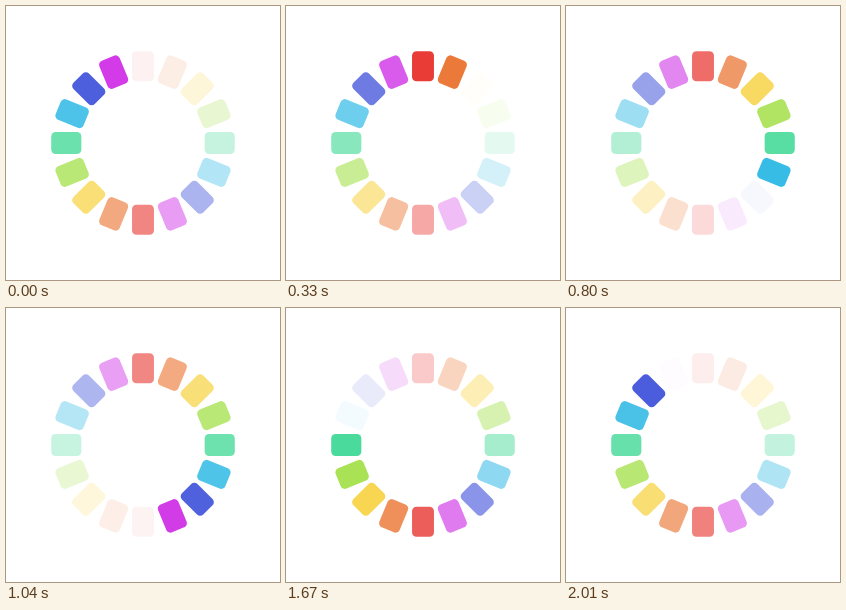
These frames come from a looping animation (274x274 px, 2.04 s). An HTML page:

```html
<!DOCTYPE html>
<html lang="en">
<head>
<meta charset="utf-8">
<title>Rainbow spinner</title>
<style>
  html, body { margin: 0; width: 100%; height: 100%; overflow: hidden; background: #fff; }
  svg { display: block; width: 100%; height: 100%; }
</style>
</head>
<body>
<svg viewBox="0 0 100 100"></svg>
<script>
const LOOP = 2040, STEPS = 61, COUNT = 16;
const colors = ['#e6261f', '#eb7532', '#f7d038', '#a3e048', '#49da9a', '#34bbe6', '#4355db', '#d23be7'];
const svg = document.querySelector('svg');

const bars = Array.from({ length: COUNT }, (_, i) => {
  const bar = document.createElementNS('http://www.w3.org/2000/svg', 'rect');
  const attrs = {
    x: 46, y: 16.5, width: 8, height: 11, rx: 1.6,
    fill: colors[i % colors.length],
    transform: `rotate(${i * 360 / COUNT} 50 50)`
  };
  for (const key in attrs) bar.setAttribute(key, attrs[key]);
  return svg.appendChild(bar);
});

// Each bar lights up in turn, then fades linearly over one loop.
function draw(ms) {
  const phase = Math.floor((ms % LOOP + 5) / LOOP * STEPS) / STEPS;
  bars.forEach((bar, i) => {
    const age = (phase + 1 - (i + 1) % COUNT / COUNT) % 1;
    bar.style.opacity = 1 - age;
  });
}

const start = performance.now();
function tick() {
  draw(performance.now() - start);
  requestAnimationFrame(tick);
}
tick();
</script>
</body>
</html>
```
